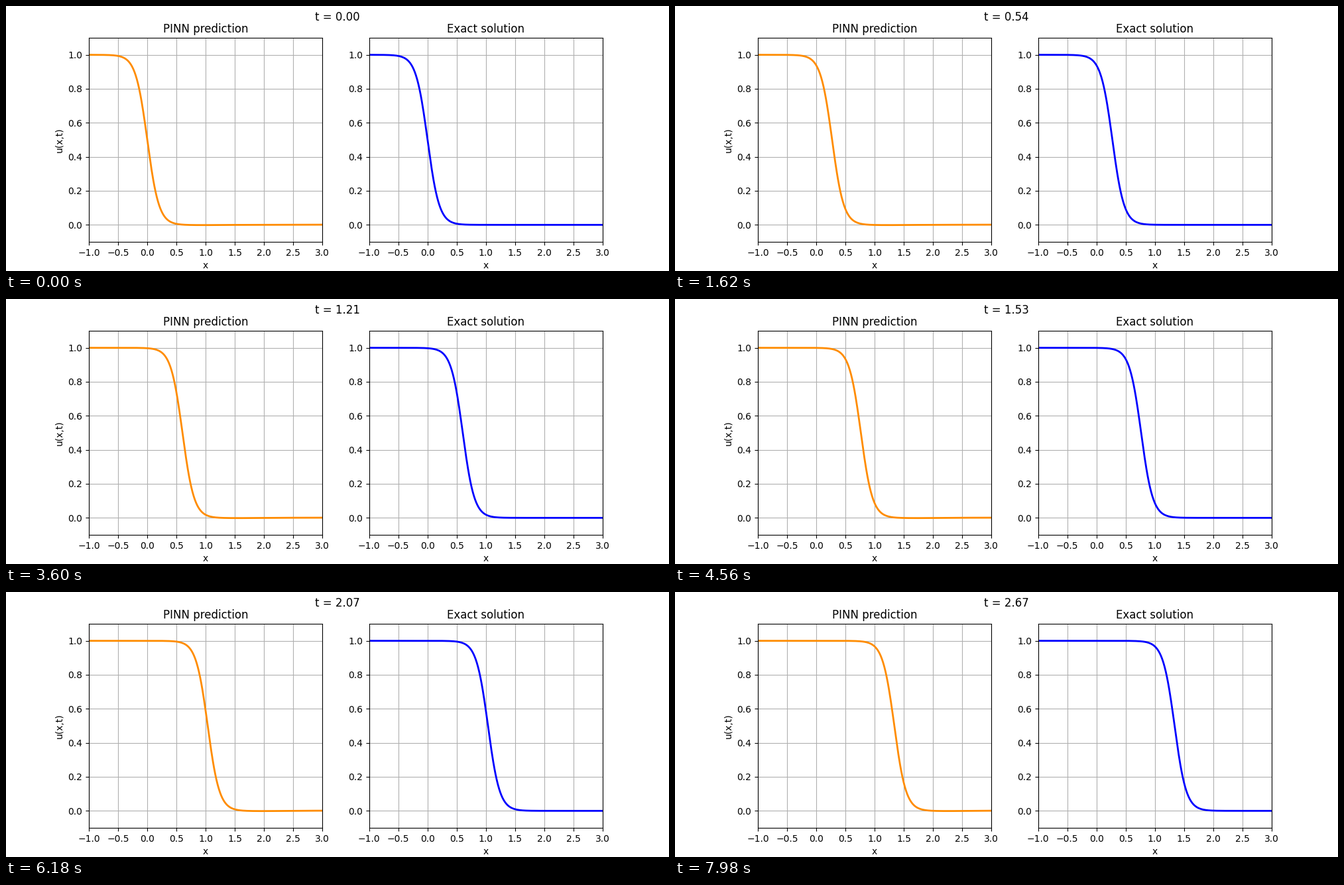
A matplotlib script for the animation above (8000 ms loop, 1000 by 400 pixels).

```python
import numpy as np
import matplotlib.pyplot as plt
from matplotlib.animation import FuncAnimation

TICK_MS = 20
LOOP_MS = 8000
TICKS_PER_STEP = 3
TIMES = np.linspace(0, 4, 200)
STEEPNESS = 10
SPEED = 0.5

x = np.linspace(-1, 3, 400)


def exact(t):
    """Travelling wave solution of the Burgers equation."""
    return 1 / (1 + np.exp(STEEPNESS * (x - SPEED * t)))


def predicted(t):
    """Exact wave with the small residual error of a trained network."""
    foot = SPEED * t + 0.9
    dip = -0.0015 * np.exp(-((x - foot) / 0.5) ** 2)
    rise = 0.001 / (1 + np.exp(-5 * (x - 2.4)))
    return exact(t) + dip + rise


def make_panel(ax, title, color):
    ax.set(xlim=(-1, 3), ylim=(-0.1, 1.1), title=title, xlabel="x")
    ax.grid(True)
    ax.spines[:].set_visible(False)
    return ax.plot([], [], color=color, lw=2)[0]


def freeze_backdrop(fig, axes):
    """Render the static parts once, so each frame only draws what moves."""
    fig.canvas.draw()
    fig.figimage(np.array(fig.canvas.buffer_rgba()), zorder=-1)
    for ax in axes:
        ax.set_title("")
        ax.patch.set_visible(False)
        ax.xaxis.set_visible(False)
        ax.yaxis.set_visible(False)
        ax.spines[:].set_visible(True)


fig, axes = plt.subplots(1, 2, figsize=(10, 4), dpi=100)
left = make_panel(axes[0], "PINN prediction", "darkorange")
right = make_panel(axes[1], "Exact solution", "blue")
axes[0].set_ylabel("u(x,t)")
freeze_backdrop(fig, axes)
clock = fig.suptitle("")


def update(tick):
    t = TIMES[tick // TICKS_PER_STEP]
    left.set_data(x, predicted(t))
    right.set_data(x, exact(t))
    clock.set_text(f"t = {t:.2f}")
    return left, right, clock


anim = FuncAnimation(fig, update, frames=LOOP_MS // TICK_MS, interval=TICK_MS,
                     repeat=True, repeat_delay=0)
plt.show()
```
